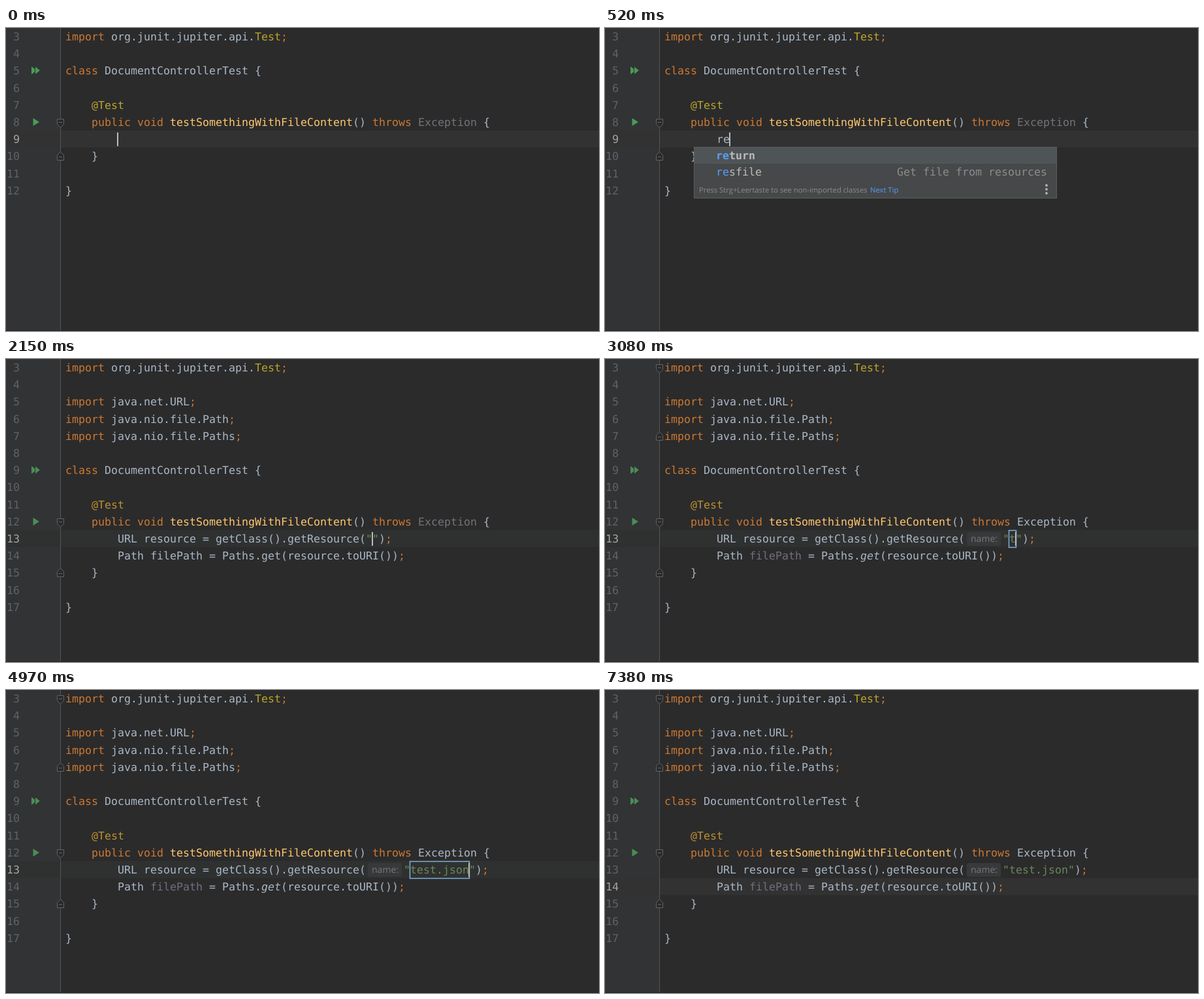
Write an HTML page that moves like this. It is 908 px wide and 464 px high and loops after 7.69 s.

```html
<!DOCTYPE html>
<html lang="en">
<head>
<meta charset="utf-8">
<title>Live template in a code editor</title>
<style>
html, body { margin: 0; width: 100%; height: 100%; overflow: hidden; background: #2b2b2b; }
svg { display: block; }
text {
  font: 16.61px "DejaVu Sans Mono", "Noto Sans Mono", monospace;
  fill: #a9b7c6; white-space: pre; text-rendering: geometricPrecision;
}
.k { fill: #cc7832; }
.y { fill: #bba52c; }
.a { fill: #bd912f; }
.m { fill: #ffc66d; }
.g { fill: #72737a; }
.v { fill: #736d80; }
.s { fill: #6a8759; }
.i { font-style: italic; }
.num { fill: #606366; }
.num.now { fill: #a4a3a3; }
.item { fill: #bbbbbb; }
.first { font-weight: bold; }
.b { fill: #589df6; }
.tail { fill: #8c8c8c; text-anchor: end; }
.tip, .hint { font: 11.26px "Open Sans", "Noto Sans", sans-serif; fill: #8c8c8c; }
.tip.b { fill: #589df6; }
.hint { font-size: 14px; fill: #787878; }
.fold { fill: #2b2b2b; stroke: #606366; }
</style>
</head>
<body>
<svg id="stage" width="908" height="464" viewBox="0 0 908 464"></svg>
<script>
const LOOP = 7690;
const WORD = "resfil", FILE = "test.json";
const WORD_TIMES = [300, 450, 760, 910, 1140, 1310];
const POPUP_TIMES = [360, 520, 830, 990, 1140, 1310];
const FILE_TIMES = [3080, 3170, 3400, 3480, 4030, 4330, 4650, 4800, 4970];
const INSERT = 2070, IMPORTS = 2150, RESOLVED = 2470, CHECKED = 3080, LEAVE = 5750;
const CUTS = [...WORD_TIMES, ...POPUP_TIMES, ...FILE_TIMES,
  1840, INSERT, IMPORTS, RESOLVED, LEAVE, 6360, 6830, 7380];

const stage = document.getElementById("stage");
const passed = (times, t) => times.filter(x => x <= t).length;
const mid = line => Math.round(13 + 26.2 * (line - 3));

// "[k word]" colours a word with class k
const paint = s => s.replace(/\[(\w) (.+?)\]/g, '<tspan class="$1">$2</tspan>');
const text = (x, y, s, cls = "") => `<text x="${x}" y="${y}" class="${cls}">${paint(s)}</text>`;
const rect = (x, y, w, h, fill, extra = "") =>
  `<rect x="${x}" y="${y}" width="${w}" height="${h}" fill="${fill}" ${extra}/>`;
const path = (d, attrs) => `<path d="${d}" ${attrs}/>`;
const circle = (x, y, r, fill) => `<circle cx="${x}" cy="${y}" r="${r}" fill="${fill}"/>`;
const code = (line, col, s) => text(91 + 10 * col, mid(line) + 6, s);
const caret = (x, line) => rect(x, mid(line) - 10, 2, 21, "#bbbbbb");

function fold(line, up) {
  const y = mid(line) + (up ? 6.5 : -4.5), d = up ? -1 : 1;
  return path(`M78.5 ${y}h10v${8 * d}l-5 ${5 * d}l-5 ${-5 * d}z`, 'class="fold"')
    + path(`M81 ${y + 5 * d}h5`, 'class="fold"');
}

function run(line, color, twice) {
  const y = mid(line);
  const arrow = (x, w, h, extra = "") =>
    path(`M${x} ${y - h}l${w} ${h}l${-w} ${h}z`, `fill="${color}" ${extra}`);
  return twice
    ? arrow(39, 8, 6) + arrow(44.5, 8, 6.5, 'stroke="#313335" stroke-width="1"')
    : arrow(41.5, 9.5, 6);
}

function page(last, current, rowColor) {
  let out = rect(0, 0, 83, 464, "#313335")
    + rect(0, mid(current) - 13, 908, 26, rowColor)
    + rect(83, 0, 1, 464, "#555555");
  for (let n = 3; n <= last; n++)
    out += text(n < 10 ? 11 : 1, mid(n) + 6, String(n), n === current ? "num now" : "num");
  return out + rect(0, 463, 908, 1, "#222324");
}

function testClass(top, size, note, exception, green) {
  const sign = top + 3, end = sign + size + 1;
  return code(3, 0, "[k import] org.junit.jupiter.api.[y Test][k ;]")
    + code(top, 0, "[k class] DocumentControllerTest {")
    + code(top + 2, 4, `[${note} @Test]`)
    + code(sign, 4, `[k public] [k void] [m testSomethingWithFileContent]() [k throws] ${exception} {`)
    + code(end, 4, "}")
    + code(end + 2, 0, "}")
    + run(top, green, true) + run(sign, green)
    + fold(sign) + fold(end, true);
}

function snippet(line, t) {
  const ready = t >= RESOLVED, n = passed(FILE_TIMES, t);
  const x = ready ? 609 : 551, y = mid(line);
  const name = ready ? FILE.slice(0, n) : "";
  let out = code(line, 8, "URL resource = getClass().getResource(")
    + text(x, y + 6, `[s "${name}"])[k ;]`)
    + code(line + 1, 8, `Path ${t >= CHECKED ? "[v filePath]" : "filePath"} = Paths.`
      + `${ready ? "[i get]" : "get"}(resource.toURI())[k ;]`);
  if (ready) out += rect(554, y - 10, 52, 21, "#37393a", 'rx="3"') + text(560, y + 5, "name:", "hint");
  if (t >= LEAVE) return out + (t < 6360 || (t >= 6830 && t < 7380) ? caret(610, line + 1) : "");
  if (ready) out += rect(618.5, y - 12.5, 10 * n + 1, 26, "none", 'stroke="#7fb0d8" stroke-width="1.5"');
  return out + caret(x + 9 + 10 * n, line);
}

const ITEMS = [
  ["return", ""],
  ["toString()", "String"],
  ["resfile", "Get file from resources"],
  ["rgS", "get a String from resources"],
  ["ritar", "Iterate elements of array in reverse order"],
  ["rouiT", "runOnUIThread"]
];

function popup(prefix, bulb) {
  const items = prefix === "r" ? ITEMS : ITEMS.filter(([name]) => name.startsWith(prefix));
  const foot = 183 + 25 * items.length, dotY = foot + 14;
  let out = rect(136.5, 182.5, 555, foot + 28 - 183, "#46484a", 'stroke="#5b5d5f"')
    + rect(137, 183, 554, 25, "#4f5457");
  items.forEach(([name, tail], i) => {
    const y = 201 + 25 * i;
    const label = name.replace(prefix, `[b ${prefix}]`).replace("()", "[g ()]").replace("[g", "[tail".slice(0, 1) + "g");
    out += text(170, y, label, name === "return" ? "item first" : "item") + text(677, y, tail, "tail");
    if (name === "toString()")
      out += circle(155, y - 5, 8.5, "#ad6f78")
        + `<text x="155" y="${y - 1}" class="hint" text-anchor="middle" style="fill:#332a2d;font-size:13px">m</text>`;
  });
  const short = prefix === "re";
  out += text(144, foot + 19, short
      ? "Press Strg+Leertaste to see non-imported classes"
      : "Press Strg+. to choose the selected (or first) suggestion and insert a dot afterwards", "tip")
    + text(short ? 406 : 581, foot + 19, "Next Tip", "tip b");
  for (const d of [-6, 0, 6]) out += circle(676, dotY + d, 1.9, "#afb1b3");
  if (bulb)
    out += circle(646, dotY - 2.5, 6.5, "#f4af3d")
      + rect(643, dotY + 2, 6, 3, "#f4af3d")
      + rect(643, dotY + 6, 6, 1.2, "#afb1b3") + rect(644, dotY + 8, 4, 1.2, "#afb1b3");
  return out;
}

function before(t) {
  const inserted = t >= INSERT;
  const typed = passed(WORD_TIMES, t), shown = passed(POPUP_TIMES, t);
  let out = page(inserted ? 13 : 12, 9, "#323232")
    + testClass(5, inserted ? 2 : 1, "y", "[g Exception]", "#499c54");
  if (inserted) return out + snippet(9, t);
  out += code(9, 8, WORD.slice(0, typed));
  if (t < 1840) out += caret(170 + 10 * typed, 9);
  return out + (shown ? popup(WORD.slice(0, shown), t >= 1840) : "");
}

function after(t) {
  const left = t >= LEAVE;
  let out = page(17, left ? 14 : 13, left ? "#323232" : "#2f3131")
    + testClass(9, 2, "a", t >= CHECKED ? "Exception" : "[g Exception]", "#4b8d55");
  ["net.URL", "nio.file.Path", "nio.file.Paths"].forEach((name, i) => {
    out += code(5 + i, 0, `[k import] java.${name}[k ;]`);
  });
  if (t >= RESOLVED) out += fold(3) + fold(7, true);
  return out + snippet(13, t);
}

let shownCut = -1;
function tick(now) {
  const t = now % LOOP, cut = passed(CUTS, t);
  if (cut !== shownCut) {
    shownCut = cut;
    stage.innerHTML = t < IMPORTS ? before(t) : after(t);
  }
  requestAnimationFrame(tick);
}
const start = performance.now();
const loop = () => tick(Math.max(0, performance.now() - start));
tick = (draw => () => draw(Math.max(0, performance.now() - start)))(tick);
loop();
</script>
</body>
</html>
```
